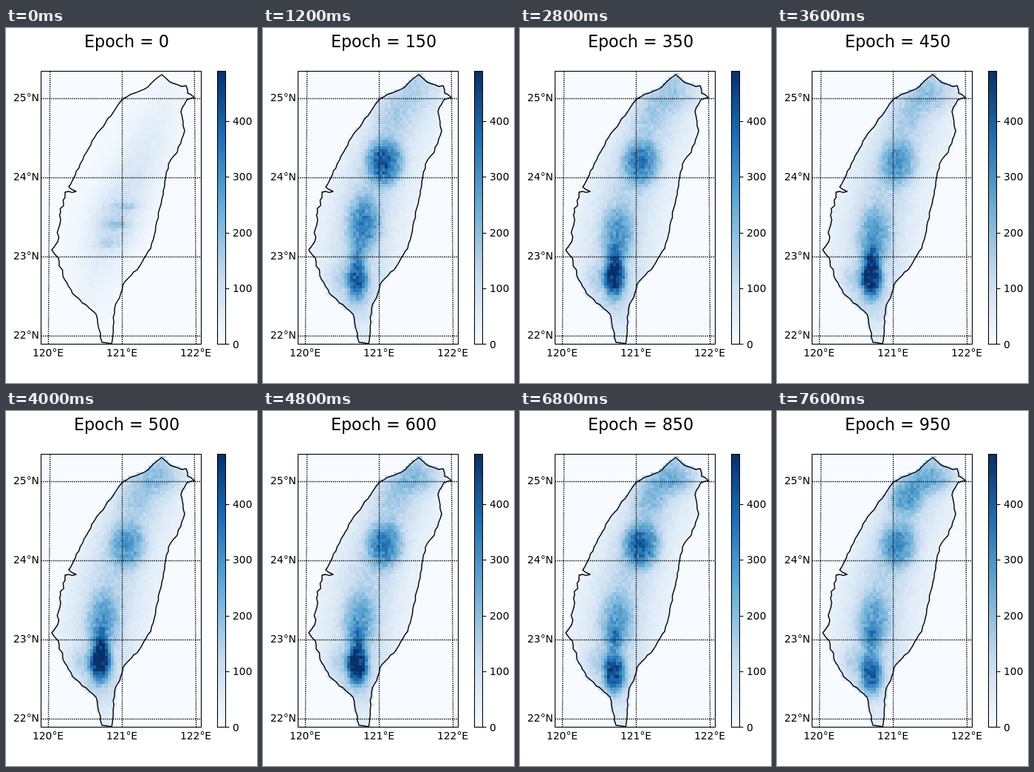
These frames come from a looping animation (340 by 480 pixels, 8.8 s). An HTML page with a canvas:

```html
<!DOCTYPE html>
<html lang="en">
<head>
<meta charset="utf-8">
<title>Density map by epoch</title>
<style>
html, body { margin: 0; width: 100%; height: 100%; overflow: hidden; background: #fff; }
canvas { display: block; }
</style>
</head>
<body>
<canvas id="stage" width="340" height="480"></canvas>
<script>
const ctx = document.getElementById('stage').getContext('2d');
const LOOP = 8800, STEP = 400, LAST = 19, VMAX = 489.5;
const BOX = { x: 47.5, y: 58.5, w: 217, h: 369 };
const FONT = '"DejaVu Sans", sans-serif';
const BLUES = [[247, 251, 255], [198, 219, 239], [107, 174, 214], [33, 113, 181], [8, 48, 107]];

// Capes and bays, clockwise from the northern tip
const SHORE = [[211, 63], [222, 73], [238, 79], [244, 78], [246, 88], [255, 94], [245, 97], [237, 113],
  [242, 139], [232, 168], [220, 184], [213, 225], [196, 298], [181, 322], [161, 343], [147, 380],
  [143, 427], [130, 425], [122, 387], [90, 359], [77, 335], [71, 311], [62, 300], [70, 289],
  [74, 249], [80, 222], [95, 221], [85, 215], [104, 178], [120, 148], [146, 113], [158, 96], [192, 80]];

const hash = (a, b, c) => {
  const s = Math.sin(a * 12.9898 + b * 78.233 + c * 37.719) * 43758.5453;
  return s - Math.floor(s);
};
const bell = (d, spread) => Math.exp(-d * d / (2 * spread * spread));
const wave = (k, peak, period) => Math.cos((k - peak) / period * 2 * Math.PI);

function blue(v) {
  const top = BLUES.length - 1, t = Math.max(0, Math.min(1, v / VMAX)) * top;
  const i = Math.min(top - 1, Math.floor(t));
  return `rgb(${BLUES[i].map((c, n) => Math.round(c + (BLUES[i + 1][n] - c) * (t - i)))})`;
}

// Straight reaches broken into short, slightly jagged steps
function coastPath() {
  const path = new Path2D();
  SHORE.forEach(([x, y], i) => {
    const [nx, ny] = SHORE[(i + 1) % SHORE.length];
    const steps = Math.max(1, Math.round(Math.hypot(nx - x, ny - y) / 6));
    const rough = Math.max(x, nx) < 81 ? 4 : 2;
    path.lineTo(x, y);
    for (let n = 1; n < steps; n++) {
      path.lineTo(x + (nx - x) * n / steps + (hash(i, n, 1) - 0.5) * rough,
        y + (ny - y) * n / steps + (hash(i, n, 2) - 0.5) * rough);
    }
  });
  path.closePath();
  return path;
}

// Meridians lean inwards towards the north
const mapX = (lon, y) => 157.5 + (lon - 121) * (100 - 2 * (416 - y) / 321);
const mapY = lat => 95.5 + (25 - lat) * 107;

function makeCells(coast) {
  const cells = [];
  ctx.lineWidth = 4;
  for (let j = -3; j < 84; j++) {
    const top = Math.round(mapY(22 + (j + 1) / 25)), bottom = Math.round(mapY(22 + j / 25));
    const y = (top + bottom) / 2;
    for (let i = 0; i < 52; i++) {
      const left = Math.round(mapX(120 + i / 25, y)), right = Math.round(mapX(120 + (i + 1) / 25, y));
      const x = (left + right) / 2;
      if (ctx.isPointInPath(coast, x, y) || ctx.isPointInStroke(coast, x, y)) {
        cells.push({ i, j, x, y, left, top, w: right - left, h: bottom - top });
      }
    }
  }
  return cells;
}

const coast = coastPath();
const cells = makeCells(coast);

// Flat-topped spots at step k: x, y, radius x, radius y, height
function spotsAt(k) {
  const settle = Math.exp(-Math.max(0, k - 3) / 3);
  return [
    [165, 182, 24, 29, 220 + 70 * wave(k, 15, 11)],
    [131 + 5 * settle, 284 - 20 * settle, 22, 36, 130 + 65 * settle],
    [128, 346 - 9 * wave(k, 7, 24), 14, 26, 265 + 110 * wave(k, 11, 32)],
    [128, 308, 12, 20, 90],
    [105, 338, 18, 18, 50],
    [207, 93, 34, 20, 10 + 5.5 * k],
    [174, 118, 22, 22, 30 + 110 * Math.exp((k - LAST) / 2)]
  ];
}

// Starting state: a faint slanted cloud with three streaks
function cloud(x, y) {
  let v = 8 + 75 * bell(x - 200 + (y - 130) * 0.38, 24) * bell(y - 225, 85)
    + 60 * bell(x - 145, 20) * bell(y - 266, 25);
  for (let n = 0; n < 3; n++) v += 70 * bell(x - 164 + 13 * n, 13) * bell(y - 241 - 25 * n, 3.5);
  return v;
}

function ridge(x, y, spots) {
  const off = x - 126 - 0.0009 * (y - 370) ** 2;
  const fade = Math.max(0.3, Math.min(1, (430 - y) / 60));
  let v = 20 + (38 * bell(off, 45) + 82 * bell(off, 25)) * fade;
  for (const [sx, sy, rx, ry, height] of spots) {
    v += height * Math.exp(-(Math.hypot((x - sx) / rx, (y - sy) / ry) ** 3));
  }
  return v;
}

function text(str, x, y, size, align) {
  ctx.font = `${size}px ${FONT}`;
  ctx.textAlign = align;
  ctx.fillStyle = '#000';
  ctx.fillText(str, x, y);
}

function line(x1, y1, x2, y2) {
  ctx.beginPath();
  ctx.moveTo(x1, y1);
  ctx.lineTo(x2, y2);
  ctx.stroke();
}

function drawCells(k) {
  const early = Math.exp(-k * 1.1), spots = spotsAt(k);
  for (const { i, j, x, y, left, top, w, h } of cells) {
    const grain = 0.8 + 0.2 * hash(i, j, 0) + 0.2 * hash(i, j, k + 1);
    const v = early * cloud(x, y) + (1 - early) * ridge(x, y, spots);
    ctx.fillStyle = blue(v * grain);
    ctx.fillRect(left, top, w, h);
  }
}

function drawMap(k) {
  const { x, y, w, h } = BOX;
  ctx.save();
  ctx.beginPath();
  ctx.rect(x, y, w, h);
  ctx.clip();
  ctx.fillStyle = blue(0);
  ctx.fillRect(x, y, w, h);
  drawCells(k);
  ctx.strokeStyle = '#000';
  ctx.lineWidth = 1.4;
  ctx.lineJoin = 'round';
  ctx.stroke(coast);
  ctx.setLineDash([1.39, 1.39]);
  for (let lat = 22; lat <= 25; lat++) line(x, mapY(lat), x + w, mapY(lat));
  for (let lon = 120; lon <= 122; lon++) line(mapX(lon, y + h), y + h, mapX(lon, y), y);
  ctx.restore();
  ctx.lineWidth = 1.1;
  ctx.strokeStyle = '#000';
  ctx.strokeRect(x, y, w, h);
  for (let lat = 22; lat <= 25; lat++) text(lat + '°N', 45, mapY(lat) + 3.5, 13.89, 'right');
  for (let lon = 120; lon <= 122; lon++) text(lon + '°E', mapX(lon, 416) - 0.5, 444, 13.89, 'center');
}

function drawScale() {
  const x = 286.5, w = 11, { y, h } = BOX;
  const ramp = ctx.createLinearGradient(0, y + h, 0, y);
  BLUES.forEach((c, i) => ramp.addColorStop(i / (BLUES.length - 1), `rgb(${c})`));
  ctx.fillStyle = ramp;
  ctx.fillRect(x, y, w, h);
  ctx.strokeRect(x, y, w, h);
  for (let v = 0; v <= 400; v += 100) {
    const at = y + h - v / VMAX * h;
    const ty = Math.floor(at + 0.45) + 0.5;
    line(x + w, ty, x + w + 5, ty);
    text(v, 307, Math.floor(at + 4.52) + 0.5, 13.89, 'left');
  }
}

let shown = -1;
function tick(now) {
  const k = Math.min(LAST, Math.floor(now % LOOP / STEP));
  if (k !== shown) {
    shown = k;
    ctx.fillStyle = '#fff';
    ctx.fillRect(0, 0, 340, 480);
    drawMap(k);
    drawScale();
    text('Epoch = ' + k * 50, 163.5, 26, 22.22, 'center');
  }
  requestAnimationFrame(tick);
}
tick(performance.now());
</script>
</body>
</html>
```
